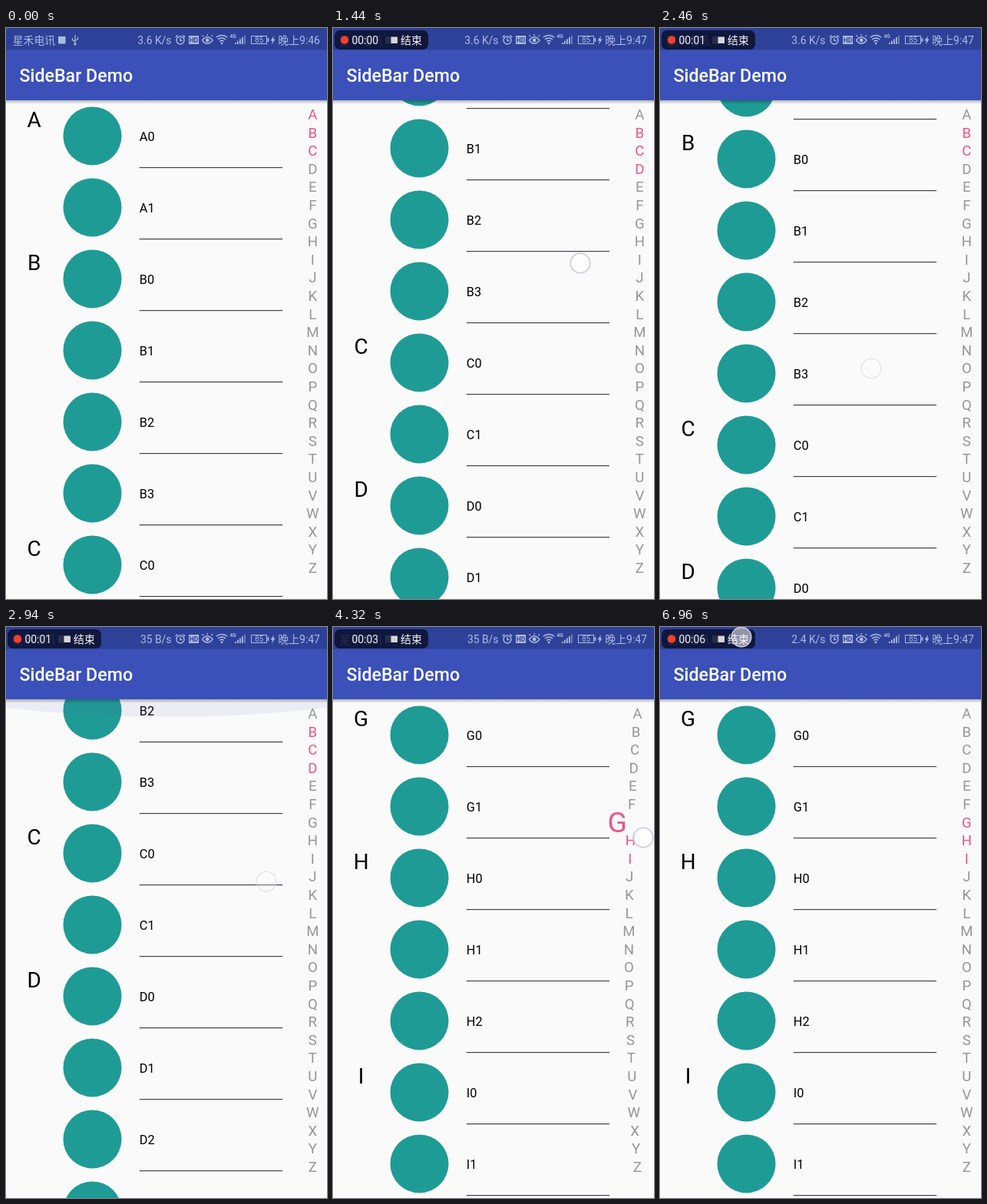
Animation of 418x743 px, one loop 7.02 s. Source, as an HTML page with a canvas:

```html
<!DOCTYPE html>
<html lang="zh">
<head>
<meta charset="utf-8">
<title>SideBar Demo</title>
<style>
  html, body { margin: 0; width: 100%; height: 100%; overflow: hidden; background: #fafafa; }
  canvas { display: block; }
</style>
</head>
<body>
<canvas id="stage" width="418" height="743"></canvas>
<script>
const ctx = document.getElementById('stage').getContext('2d');
const W = 418, H = 743, LOOP = 7020, STEP = 60;
const BAR_BOTTOM = 94, ROW = 93, PITCH = 23.6, FIRST_LETTER = 112.3;
const PINK = '#ee5588', GREY = '#969696', ICON = '#1f9b95', STATUS = '#aebbe2';
const FONT = 'Roboto, "Noto Sans CJK SC", "Noto Sans CJK", sans-serif';
const RECORD_START = 950;

const letters = [...'ABCDEFGHIJKLMNOPQRSTUVWXYZ'];
const counts = [...'24243323211224312324132223'].map(Number);
const rows = [], firstRow = [];
letters.forEach((letter, section) => {
  firstRow.push(rows.length);
  for (let n = 0; n < counts[section]; n++) rows.push({ letter, section, n });
});

// Each key is [time, ...values]; values run linearly between keys.
function track(keys, t) {
  if (t <= keys[0][0]) return keys[0].slice(1);
  for (let i = 1; i < keys.length; i++) {
    const [a, b] = [keys[i - 1], keys[i]];
    if (t <= b[0]) {
      const k = (t - a[0]) / (b[0] - a[0]);
      return a.slice(1).map((v, j) => v + (b[j + 1] - v) * k);
    }
  }
  return keys[keys.length - 1].slice(1);
}

const scrollKeys = [
  [840, 0], [900, 8], [1440, 263], [1620, 369], [1740, 480], [1860, 555], [2040, 600],
  [2160, 590], [2400, 220], [2460, 156], [2580, 0], [2700, 0], [2760, 90], [2880, 335],
  [2940, 404], [3060, 510], [3180, 590], [3360, 660], [3540, 680]
];
// time, x, y, opacity
const touches = [
  [[840, 314, 590, 1], [900, 315, 569, 1], [1440, 322, 306, 1], [1620, 326, 200, 1], [1740, 326, 195, 0]],
  [[2100, 306, 180, 1], [2160, 304, 190, 1], [2400, 277, 430, 1], [2460, 275, 443, 0.4], [2520, 275, 443, 0]],
  [[2700, 347, 640, 1], [2760, 345, 575, 1], [2880, 340, 345, 1], [2940, 339, 331, 0.45], [3000, 339, 331, 0]],
  [[3600, 402, 130, 1], [4320, 404, 274, 1], [4920, 407, 412, 1], [5160, 408, 412, 1], [5760, 408, 308, 1],
   [6180, 405, 265, 1], [6420, 404, 264, 1], [6540, 404, 264, 0]],
  [[6900, 106, 13, 0.6], [6960, 106, 13, 1], [7020, 106, 13, 1]]
];
const slide = touches[3];
const openKeys = [[3540, 0], [3780, 1], [6420, 1], [6720, 0]];
const glowKeys = [[2520, 0], [2640, 1], [2940, 0.8], [3240, 0]];

function text(str, x, y, size, color, align = 'left', weight = 400) {
  ctx.font = `${weight} ${size}px ${FONT}`;
  ctx.textAlign = align;
  ctx.fillStyle = color;
  ctx.fillText(str, x, y);
}
function rect(x, y, w, h, color) {
  ctx.fillStyle = color;
  ctx.fillRect(x, y, w, h);
}
function disc(x, y, r, color) {
  ctx.fillStyle = color;
  ctx.beginPath();
  ctx.arc(x, y, r, 0, 7);
  ctx.fill();
}
function arc(x, y, r, from = 0, to = Math.PI * 2) {
  ctx.beginPath();
  ctx.arc(x, y, r, from, to);
  ctx.stroke();
}
function line(...p) {
  ctx.beginPath();
  for (let i = 0; i < p.length; i += 2) ctx.lineTo(p[i], p[i + 1]);
  ctx.stroke();
}

function drawList(scroll) {
  const start = Math.max(0, Math.floor(scroll / ROW));
  rows.slice(start, start + 9).forEach((row, i) => {
    const mid = 141 + (start + i) * ROW - scroll;
    if (row.n === 0) text(row.letter, 36.6, mid - 12.5, 27.9, '#000', 'center');
    disc(112.5, mid - 0.6, 38, ICON);
    text(row.letter + row.n, 173.8, mid + 6, 16.3, '#000');
    rect(173.8, mid + 40, 186.2, 1.2, '#454349');
  });
}

function drawGlow(amount) {
  if (!amount) return;
  ctx.fillStyle = `rgba(63,81,181,${0.1 * amount})`;
  ctx.beginPath();
  ctx.moveTo(0, BAR_BOTTOM);
  ctx.lineTo(0, BAR_BOTTOM + 14 * amount);
  ctx.quadraticCurveTo(W / 2, BAR_BOTTOM + 43 * amount, W, BAR_BOTTOM + 14 * amount);
  ctx.lineTo(W, BAR_BOTTOM);
  ctx.fill();
}

function drawSideBar(scroll, open, selected) {
  const shown = new Set();
  rows.forEach((row, i) => {
    const mid = 141 + i * ROW - scroll;
    if (mid - 46 >= BAR_BOTTOM && mid + 43 <= H) shown.add(row.section);
  });
  letters.forEach((letter, i) => {
    const bend = 14 - 11 * ((i - 12.5) / 12.5) ** 2;
    const big = i === selected ? open : 0;
    const size = 18.6 * (1 + big);
    const x = 399.3 - bend * open - 18 * big;
    const y = FIRST_LETTER + i * PITCH + size * 0.355;
    text(letter, x, y, size, shown.has(i) || big ? PINK : GREY, 'center');
  });
}

function drawStatusIcons() {
  ctx.strokeStyle = STATUS;
  ctx.lineWidth = 1.4;
  // alarm clock
  arc(227, 16, 5);
  line(227, 13, 227, 16.5, 229.5, 16.5);
  line(220.8, 12, 223.5, 9.5);
  line(230.5, 9.5, 233.2, 12);
  // HD badge
  rect(238, 10, 13, 11, STATUS);
  text('HD', 244.5, 18.8, 8.5, '#303f9f', 'center', 700);
  // eye
  ctx.beginPath();
  ctx.moveTo(255.5, 16);
  ctx.quadraticCurveTo(262, 7.5, 269, 16);
  ctx.quadraticCurveTo(262, 24.5, 255.5, 16);
  ctx.stroke();
  disc(262.2, 16, 2.4, STATUS);
  line(257, 11, 255.5, 9.5);
  line(262.2, 10, 262.2, 8);
  line(267.5, 11, 269, 9.5);
  // wifi
  [4, 7.5, 11].forEach(r => arc(281, 20.5, r, -2.3, -0.84));
  disc(281, 20, 1.4, STATUS);
  // signal
  text('4G', 291.5, 13, 6.5, STATUS, 'left', 700);
  for (let i = 0; i < 5; i++) rect(298 + i * 3, 19 - i * 2.3, 1.8, 2 + i * 2.3, i < 4 ? STATUS : '#7482bd');
  // battery
  ctx.lineWidth = 1;
  ctx.strokeRect(319.5, 10.5, 20, 10);
  rect(340.5, 13, 1.8, 5, STATUS);
  text('85', 329.5, 19.2, 10, STATUS, 'center');
  ctx.fillStyle = STATUS;
  ctx.beginPath();
  [[349, 10], [344.5, 16.5], [347, 16.5], [346, 21.5], [350.5, 14.5], [348, 14.5]]
    .forEach(p => ctx.lineTo(...p));
  ctx.fill();
}

function drawRecorder(t) {
  const elapsed = Math.max(0, t - RECORD_START);
  const phase = elapsed % 1000;
  ctx.fillStyle = 'rgba(10,14,42,0.82)';
  ctx.beginPath();
  ctx.roundRect(2, 3, 122, 25, 7);
  ctx.fill();
  if (phase < 130 || phase > 420) disc(15, 15.5, 5.3, '#f2402c');
  text('00:0' + Math.floor(elapsed / 1000), 24.5, 20.5, 13.9, '#f2f2f6');
  rect(75.5, 11.5, 8.5, 8.5, '#d5d5da');
  text('结束', 88, 20.7, 13.9, '#f2f2f6');
}

function drawBars(t) {
  const shade = ctx.createLinearGradient(0, BAR_BOTTOM, 0, BAR_BOTTOM + 5);
  shade.addColorStop(0, 'rgba(0,0,0,0.28)');
  shade.addColorStop(1, 'rgba(0,0,0,0)');
  rect(0, BAR_BOTTOM, W, 5, shade);
  rect(0, 0, W, BAR_BOTTOM, '#3b50b8');
  rect(0, 0, W, 28.5, '#2e4198');
  text('SideBar Demo', 17.5, 70, 23.2, '#fff', 'left', 500);

  text('星禾电讯', 8.7, 20.7, 13.9, STATUS);
  rect(68, 11, 9.5, 9.5, STATUS);
  ctx.strokeStyle = STATUS;
  ctx.lineWidth = 1.2;
  line(90, 9, 90, 21);
  line(86.5, 13, 86.5, 15.5, 90, 18);
  line(93.5, 12, 93.5, 14.5, 90, 16.5);
  disc(90, 21, 1.6, STATUS);
  const speed = t < 2700 ? '3.6 K/s' : t < 5160 ? '35 B/s' : '2.4 K/s';
  text(speed, 215.5, 20.7, 13.9, STATUS, 'right');
  drawStatusIcons();
  text(t < 720 ? '晚上9:46' : '晚上9:47', 354.3, 20.7, 13.9, STATUS);
  if (t >= 720) drawRecorder(t);
}

function drawTouch(t) {
  const keys = touches.find(k => t >= k[0][0] && t <= k[k.length - 1][0]);
  if (!keys) return;
  const [x, y, alpha] = track(keys, t);
  ctx.globalAlpha = alpha;
  disc(x, y, 13, 'rgba(255,255,255,0.55)');
  ctx.strokeStyle = '#c9c9e3';
  ctx.lineWidth = 1.6;
  arc(x, y, 12.7);
  ctx.globalAlpha = 1;
}

function draw(t) {
  let scroll = track(scrollKeys, t)[0], selected = -1;
  if (t >= slide[0][0]) {
    selected = Math.floor((track(slide, t)[1] - 112) / PITCH);
    scroll = firstRow[selected] * ROW;
  }
  rect(0, 0, W, H, '#fafafa');
  drawList(scroll);
  drawGlow(track(glowKeys, t)[0]);
  drawSideBar(scroll, track(openKeys, t)[0], selected);
  drawBars(t);
  drawTouch(t);
}

const begin = performance.now();
function tick() {
  const t = (performance.now() - begin) % LOOP;
  draw(Math.floor(t / STEP) * STEP);
  requestAnimationFrame(tick);
}
tick();
</script>
</body>
</html>
```
